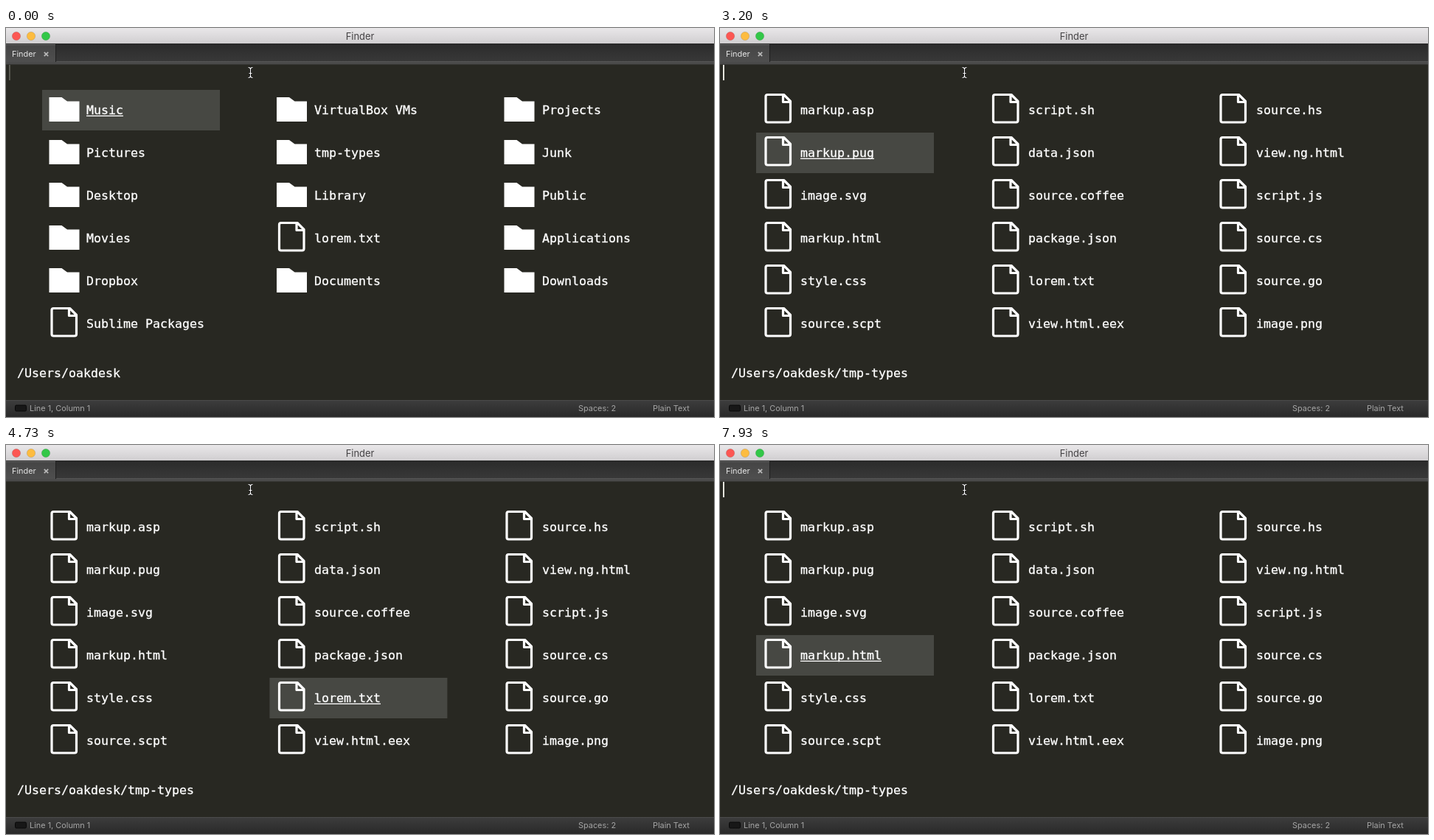
Write an HTML page that moves like this. It is 960 px wide and 528 px high and loops after 8000 ms.

```html
<!DOCTYPE html>
<html lang="en">
<head>
<meta charset="utf-8">
<title>Finder</title>
<style>
  html, body { margin: 0; width: 100%; height: 100%; overflow: hidden; background: #282822; }
  svg { display: block; width: 960px; height: 528px; }
  text { white-space: pre; }
  .mono { font-family: "DejaVu Sans Mono", monospace; fill: #fff; stroke: #fff; stroke-width: .3; }
  .item { font-size: 16.61px; }
  .code { font-size: 13.29px; fill: #f8f8f2; stroke: #f8f8f2; stroke-width: .15; }
  .number { font-size: 13.29px; fill: #90918b; stroke: none; text-anchor: end; }
  .ui { font-family: Inter, sans-serif; font-size: 10.9px; }
  .title { font-size: 12.9px; fill: #454345; text-anchor: middle; }
  .status { fill: #a5a5a5; }
</style>
</head>
<body>
<svg viewBox="0 0 960 528">
  <defs>
    <linearGradient id="titleFill" x2="0" y2="1"><stop stop-color="#e9e7e9"/><stop offset="1" stop-color="#cfcdcf"/></linearGradient>
    <linearGradient id="barFill" x2="0" y2="1"><stop stop-color="#2b2b2b"/><stop offset="1" stop-color="#393939"/></linearGradient>
    <linearGradient id="activeFill" x2="0" y2="1"><stop stop-color="#454545"/><stop offset="1" stop-color="#4f4f4f"/></linearGradient>
    <linearGradient id="idleFill" x2="0" y2="1"><stop stop-color="#353535"/><stop offset="1" stop-color="#404040"/></linearGradient>
    <linearGradient id="statusFill" x2="0" y2="1"><stop stop-color="#3d3d3d"/><stop offset="1" stop-color="#292929"/></linearGradient>
    <path id="folder" d="M58.5 94H75.500L83 99.500H99.500V127H58.500Z" fill="#fff"/>
    <path id="file" d="M64.500 90.500H86.500L95.500 99.500V125.500Q95.500 128 93 128H64.500Q62 128 62 125.500V93Q62 90.500 64.500 90.500ZM85.500 91V100.500H95" fill="none" stroke="#fff" stroke-width="3.2" stroke-linejoin="round"/>
  </defs>
  <g id="scene"></g>
</svg>
<script>
const LOOP = 8000, FRAME = 1000 / 15;
const OPEN = 4760, CLOSE = 6700, ENTER = 2230, TAB_SLIDE = 250;

const home = {
  path: "/Users/oakdesk",
  columns: [
    ["Music", "Pictures", "Desktop", "Movies", "Dropbox", "Sublime Packages"],
    ["VirtualBox VMs", "tmp-types", "Library", "lorem.txt", "Documents"],
    ["Projects", "Junk", "Public", "Applications", "Downloads"],
  ],
};
const types = {
  path: home.path + "/tmp-types",
  columns: [
    ["markup.asp", "markup.pug", "image.svg", "markup.html", "style.css", "source.scpt"],
    ["script.sh", "data.json", "source.coffee", "package.json", "lorem.txt", "view.html.eex"],
    ["source.hs", "view.ng.html", "script.js", "source.cs", "source.go", "image.png"],
  ],
};
const lorem = [
  "Lorem ipsum dolor sit amet, consectetur adipisicing elit, sed do eiusmod",
  "tempor incididunt ut labore et dolore magna aliqua. Ut enim ad minim veniam,",
  "quis nostrud exercitation ullamco laboris nisi ut aliquip ex ea commodo",
  "consequat. Duis aute irure dolor in reprehenderit in voluptate velit esse",
  "cillum dolore eu fugiat nulla pariatur. Excepteur sint occaecat cupidatat non",
  "proident, sunt in culpa qui officia deserunt mollit anim id est laborum.",
];
// [start time, column, row] of each selection
const selections = [
  [0, 0, 0], [660, 1, 0], [1130, 1, 1], [ENTER, 0, 0], [2930, 0, 1],
  [3260, 1, 1], [3390, 1, 2], [3530, 1, 3], [3660, 1, 4], [7660, 1, 3], [7860, 0, 3],
];

const clamp = v => Math.max(0, Math.min(1, v));
const rect = (x, y, w, h, fill, extra = "") =>
  `<rect x="${x}" y="${y}" width="${w}" height="${h}" fill="${fill}" ${extra}/>`;
const text = (x, y, kind, str, extra = "") =>
  `<text x="${x}" y="${y}" class="${kind}" ${extra}>${str}</text>`;
const path = (d, stroke, width, fill = "none") =>
  `<path d="${d}" fill="${fill}" stroke="${stroke}" stroke-width="${width}"/>`;

function caret(t, x, height) {
  const origin = t >= CLOSE ? CLOSE : t >= OPEN ? OPEN : 33;
  const phase = (t - origin + LOOP) % 1000;
  // distance to the middle of the lit time, wrapped around the blink period
  const distance = Math.abs((phase - 240 + 1500) % 1000 - 500);
  return rect(x, 50, 1.8, height, "#f8f8f0", `opacity="${clamp((295 - distance) / 85)}"`);
}

function tab(x, width, label, active, drop = 0) {
  const cx = x + width - 13;
  return `<g transform="translate(0 ${drop})">` +
    rect(x, 22.5, width, 25, `url(#${active ? "activeFill" : "idleFill"})`) +
    path(`M${x} 22.500H${x + width}`, active ? "#626262" : "#484848", 1) +
    path(`M${x + width} 22V47`, "#202020", 1) +
    text(x + 8, 39, "ui", label, `fill="${active ? "#e4e4e4" : "#a2a2a2"}"`) +
    path(`M${cx - 2.7} 32.800l5.400 5.400m0 -5.400l-5.400 5.400`, active ? "#b8b8b8" : "#a0a0a0", 1.7) + "</g>";
}

function titleBar(editing) {
  const lights = ["#fc5753", "#fdbc40", "#33c748"].map((color, i) =>
    `<circle cx="${14 + i * 20}" cy="11" r="5.7" fill="${color}" stroke="#000" stroke-opacity=".15" stroke-width=".8"/>`);
  const page = path("M405.500 4.500H412L415.500 8V18.500H405.500Z", "#777", 1, "#fff") + rect(407.3, 9, 6, 6, "#444");
  return rect(0, 0, 960, 22, "url(#titleFill)") + lights.join("") +
    text(editing ? 488.5 : 480, 16, "ui title", editing ? "~/tmp-types/lorem.txt" : "Finder") + (editing ? page : "");
}

function tabBar(t, editing) {
  let drop = 25;
  if (editing) drop = 25 * (1 - clamp((t - OPEN + 33) / TAB_SLIDE));
  else if (t >= CLOSE) drop = 25 * clamp((t - CLOSE) / TAB_SLIDE);
  return rect(0, 21.5, 960, 25, "url(#barFill)") + rect(0, 21.2, 960, 1, "#1d1d1d") +
    rect(0, 45, 960, 1, "#555") +
    (drop < 25 ? tab(68.5, 81, "lorem.txt", true, drop) : "") +
    tab(0, 67.5, "Finder", !editing) + rect(0, 46, 960, 4, "#4a4a4a") + rect(0, 49, 960, 1, "#373735");
}

function browser(t) {
  const folder = t < ENTER ? home : types;
  const [, column, row] = selections.filter(s => s[0] <= t).pop();
  let out = rect(49 + column * 308.4, 84 + row * 58, 241, 55, "#474843");
  folder.columns.forEach((names, c) => names.forEach((name, r) => {
    const x = 109 + c * 309, y = 117 + r * 58;
    const icon = /\.|Packages/.test(name) ? "file" : "folder";
    out += `<use href="#${icon}" x="${c * 308.5}" y="${r * 58}"/>` + text(x, y, "mono item", name);
    if (c === column && r === row) out += rect(x, y + 1.7, name.length * 10, 1.3, "#fff");
  }));
  return out + text(15, 474, "mono item", folder.path) + caret(t, 4, 21);
}

function editor(t) {
  return rect(0, 50, 46, 17, "#3b3b32") + lorem.map((line, i) =>
    text(29.8, 63 + i * 17, "mono number", i + 1) + text(50.3, 63 + i * 17, "mono code", line)).join("") +
    caret(t, 50.3, 17);
}

function statusBar() {
  return rect(0, 505, 960, 23, "url(#statusFill)") + rect(0, 505, 960, 1, "#4b4b4b") +
    rect(12.5, 512, 15, 8, "#171717", 'rx="1.5" stroke="#080808"') +
    text(32, 520, "ui status", "Line 1, Column 1") +
    text(776, 520, "ui status", "Spaces: 2") + text(877, 520, "ui status", "Plain Text");
}

function pointer(t) {
  if (t >= CLOSE && t < CLOSE + 170)
    return path("M331 55.500V69.500L334.200 66.500L336.500 71.700L338.800 70.700L336.500 65.700H341Z", "#fff", 1.1, "#111");
  const beam = "M328.500 53.500Q331.500 53.500 331.500 56V65Q331.500 67.500 328.500 67.500M334.500 53.500Q331.500 53.500 331.500 56M331.500 65Q331.500 67.500 334.500 67.500M329.500 61.500H333.500";
  return path(beam, "#111", 2.6) + path(beam, "#fff", 1.1);
}

const scene = document.getElementById("scene");
let shown = -1;

function draw(now) {
  const frame = Math.floor((now % LOOP + 4) / FRAME) % 120;
  if (frame !== shown) {
    shown = frame;
    const t = frame * FRAME;
    const editing = t >= OPEN && t < CLOSE;
    scene.innerHTML = titleBar(editing) + tabBar(t, editing) + rect(0, 50, 960, 455, "#282822") +
      (editing ? editor(t) : browser(t)) + statusBar() + pointer(t);
  }
  requestAnimationFrame(() => draw(performance.now()));
}
draw(0);
</script>
</body>
</html>
```
